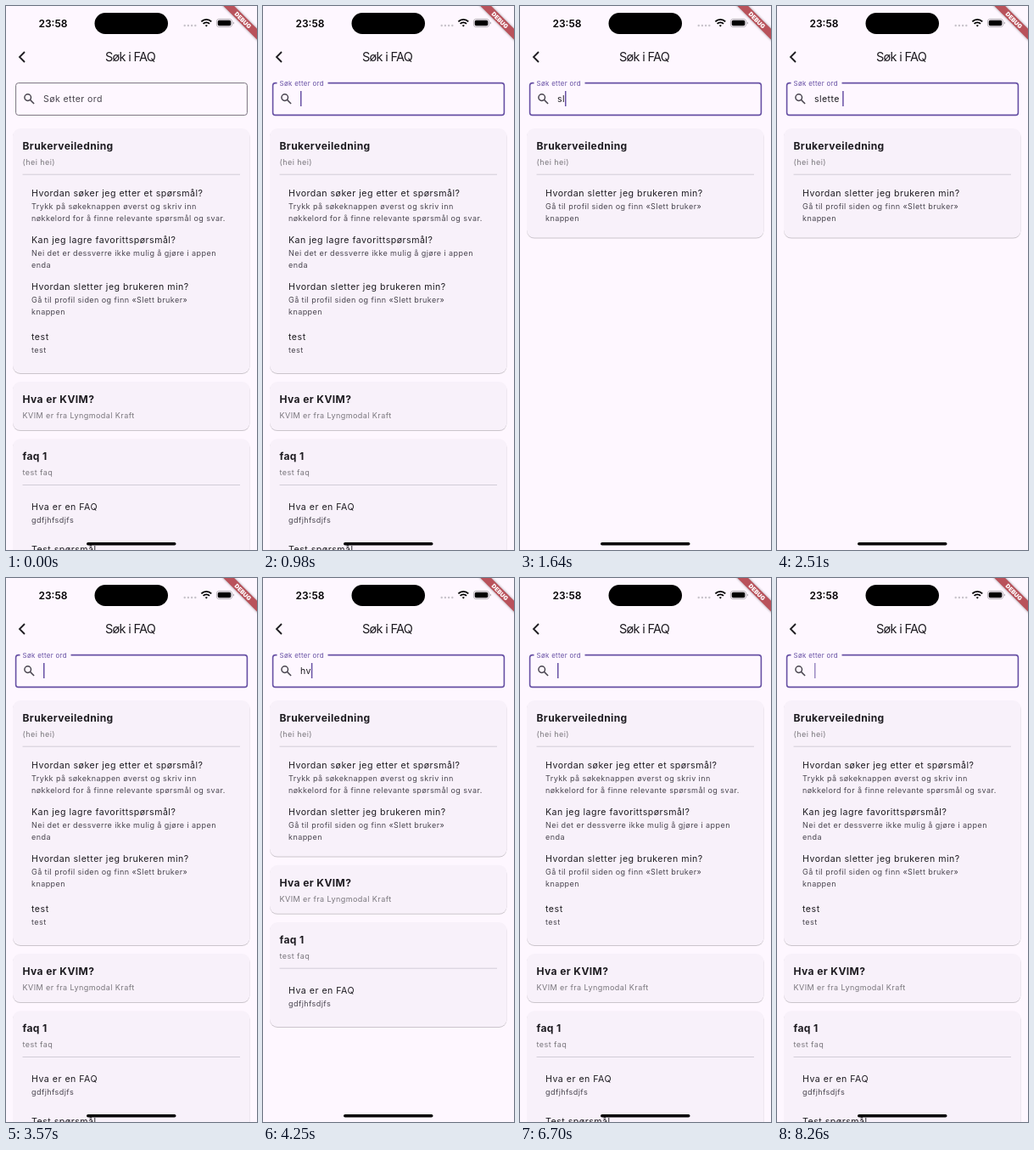
Animation, 296 px wide and 640 px high, one loop 8310 ms. Source, as an HTML page:

```html
<!DOCTYPE html>
<html lang="no">
<head>
<meta charset="utf-8">
<title>Søk i FAQ</title>
<style>
html, body { margin: 0; width: 100%; height: 100%; overflow: hidden; background: #fef7ff; }
svg { display: block; width: 100vw; height: 100vh; }
text { font-family: Inter, "Liberation Sans", sans-serif; fill: #1d1b20; white-space: pre; }
.clock { font-size: 12px; font-weight: 600; fill: #000; }
.heading { font-size: 14.5px; letter-spacing: -.7px; }
.title { font-size: 12.05px; font-weight: 700; letter-spacing: .4px; }
.sub { font-size: 9.03px; letter-spacing: .43px; fill: #79767c; }
.question { font-size: 10.6px; letter-spacing: .5px; }
.answer { font-size: 9.03px; letter-spacing: .43px; fill: #49454f; }
.field { font-size: 10.54px; letter-spacing: .43px; }
.debug { font-size: 7px; font-weight: 900; fill: #fff; text-anchor: middle; }
.card { fill: #f8f1fa; filter: drop-shadow(0 1px .6px rgba(0, 0, 0, .2)); }
</style>
</head>
<body>
<svg viewBox="0 0 296 640">
  <defs>
    <filter id="soft" x="-30%" y="-80%" width="160%" height="260%"><feGaussianBlur stdDeviation="1.8"/></filter>
  </defs>
  <rect width="296" height="640" fill="#fef7ff"/>
  <g id="list"></g>

  <text class="clock" x="38.5" y="24.5">23:58</text>
  <rect x="104.5" y="8" width="86.5" height="25" rx="12.5"/>
  <g fill="#c8c3cb">
    <circle cx="210.7" cy="23" r="1.2"/><circle cx="214.9" cy="23" r="1.2"/>
    <circle cx="219.1" cy="23" r="1.2"/><circle cx="223.3" cy="23" r="1.2"/>
  </g>
  <g fill="none" stroke="#000" stroke-width="1.9">
    <path d="M230.4 18.3a8.3 8.3 0 0 1 11.8 0M232.6 20.9a5.2 5.2 0 0 1 7.4 0"/>
    <path d="M236.3 24.6l-1.6-1.8a2.5 2.5 0 0 1 3.2 0z" fill="#000" stroke="none"/>
  </g>
  <rect x="248.4" y="15.4" width="18.2" height="9.2" rx="2.8" fill="none" stroke="#a6a1a8" stroke-width=".8"/>
  <rect x="249.7" y="16.7" width="15.6" height="6.6" rx="1.7"/>
  <path d="M267.8 18.5v3q1.2-.4 1.2-1.5t-1.2-1.5z" fill="#a6a1a8"/>

  <path d="M22 54l-6 6 6 6" fill="none" stroke="#1d1b20" stroke-width="1.8"/>
  <text class="heading" x="117" y="65.3">Søk i FAQ</text>

  <rect id="box" x="11.6" y="90.6" width="272.8" height="37.8" rx="3" fill="none"/>
  <rect id="gap" x="16.5" y="88" width="60" height="5" fill="#fef7ff"/>
  <g fill="none" stroke="#49454f" stroke-width="1.5">
    <circle cx="25.7" cy="107.6" r="3.8"/><path d="M28.5 110.4l4.6 4.6"/>
  </g>
  <text id="label" class="field">Søk etter ord</text>
  <text id="typed" class="field" x="44" y="113"></text>
  <rect id="cursor" y="100" width="1.5" height="18" fill="#6750a4"/>

  <g transform="translate(296 0) rotate(45)">
    <rect x="-32" y="19" width="64" height="9" fill="#000" opacity=".4" filter="url(#soft)"/>
    <rect x="-32" y="19" width="64" height="9" fill="#b9525b"/>
    <text class="debug" x="0" y="26.1">DEBUG</text>
  </g>
  <rect x="95" y="631" width="105.5" height="3.6" rx="1.8"/>
</svg>
<script>
const LOOP = 8310;
const groups = [
  { title: 'Brukerveiledning', sub: '(hei hei)', items: [
    ['Hvordan søker jeg etter et spørsmål?', 'Trykk på søkeknappen øverst og skriv inn', 'nøkkelord for å finne relevante spørsmål og svar.'],
    ['Kan jeg lagre favorittspørsmål?', 'Nei det er dessverre ikke mulig å gjøre i appen', 'enda'],
    ['Hvordan sletter jeg brukeren min?', 'Gå til profil siden og finn «Slett bruker»', 'knappen'],
    ['test', 'test']] },
  { title: 'Hva er KVIM?', sub: 'KVIM er fra Lyngmodal Kraft', items: [] },
  { title: 'faq 1', sub: 'test faq', items: [
    ['Hva er en FAQ', 'gdfjhfsdjfs'],
    ['Test spørsmål', 'Dette er en test']] }
];

// Each entry: start time in ms, value held until the next entry
const queries = [
  [0, ''], [1200, 's'], [1640, 'sl'], [1980, 'sle'], [2090, 'slet'], [2200, 'slette'], [2310, 'slette '],
  [3460, ''], [4010, 'h'], [4250, 'hv'], [4480, 'hvo'], [4710, 'hvor'], [4920, 'hvorda'], [5030, 'hvordan'], [6590, '']
];
const cursorAlpha = [
  [0, 0], [870, .4], [980, 1], [2910, .4], [3010, 0], [3210, 1], [5670, .35], [5790, 0], [6020, .5], [6140, 1],
  [7240, .4], [7350, 0], [7570, .5], [7680, 1], [8260, .65]
];
const focus = [[0, 0], [870, .5], [980, 1]];

const $ = id => document.getElementById(id);
const at = (track, t) => track.findLast(([start]) => start <= t)[1];
const mix = (a, b, k) => a + (b - a) * k;
const text = (cls, x, y, s) => `<text class="${cls}" x="${x}" y="${y}">${s}</text>`;

function set(el, attrs) {
  for (const name in attrs) el.setAttribute(name, attrs[name]);
}

function drawCard({ title, sub }, items, top) {
  let body = text('title', 19.5, top + 25, title) + text('sub', 19.5, top + 42.7, sub);
  let height = 57;
  if (items.length) {
    body += `<path d="M19.5 ${top + 54.2}H276" stroke="#cac4d0" stroke-width=".8"/>`;
    let offset = 0;
    for (const [question, ...answer] of items) {
      const long = answer.length > 1;
      const y = top + offset + (long ? 80.4 : 83.9);
      body += text('question', 30, y, question);
      answer.forEach((line, i) => body += text('answer', 30, y + 14.6 + i * 13.6, line));
      offset += long ? 55 : 49.3;
    }
    height = 73.6 + offset;
  }
  const card = `<rect class="card" x="8" y="${top}" width="279.5" height="${height}" rx="9"/>`;
  return { svg: card + body, bottom: top + height };
}

function drawList(query) {
  const key = query.trim();
  const matches = s => s.toLowerCase().includes(key);
  let top = 144, svg = '';
  for (const group of groups) {
    const items = group.items.filter(lines => lines.some(matches));
    if (!items.length && (group.items.length || !matches(group.title))) continue;
    const card = drawCard(group, items, top);
    svg += card.svg;
    top = card.bottom + 10.2;
  }
  $('list').innerHTML = svg;
}

let shown = null;
function render(t) {
  const query = at(queries, t);
  if (query !== shown) {
    shown = query;
    drawList(query);
    $('typed').textContent = query;
  }
  const k = at(focus, t);
  set($('box'), { stroke: k ? '#6750a4' : '#79747e', 'stroke-width': k ? 1.6 : 1 });
  set($('gap'), { opacity: k ? 1 : 0 });
  set($('label'), {
    transform: `translate(${mix(44, 19.5, k)} ${mix(113, 93.9, k)}) scale(${mix(1, .75, k)})`,
    style: `fill:${k ? '#6750a4' : '#49454f'}`
  });
  const width = query ? $('typed').getComputedTextLength() : 0;
  set($('cursor'), { x: 44 + width, opacity: at(cursorAlpha, t) });
}

function tick() {
  render(performance.now() % LOOP);
  requestAnimationFrame(tick);
}
tick();
</script>
</body>
</html>
```
